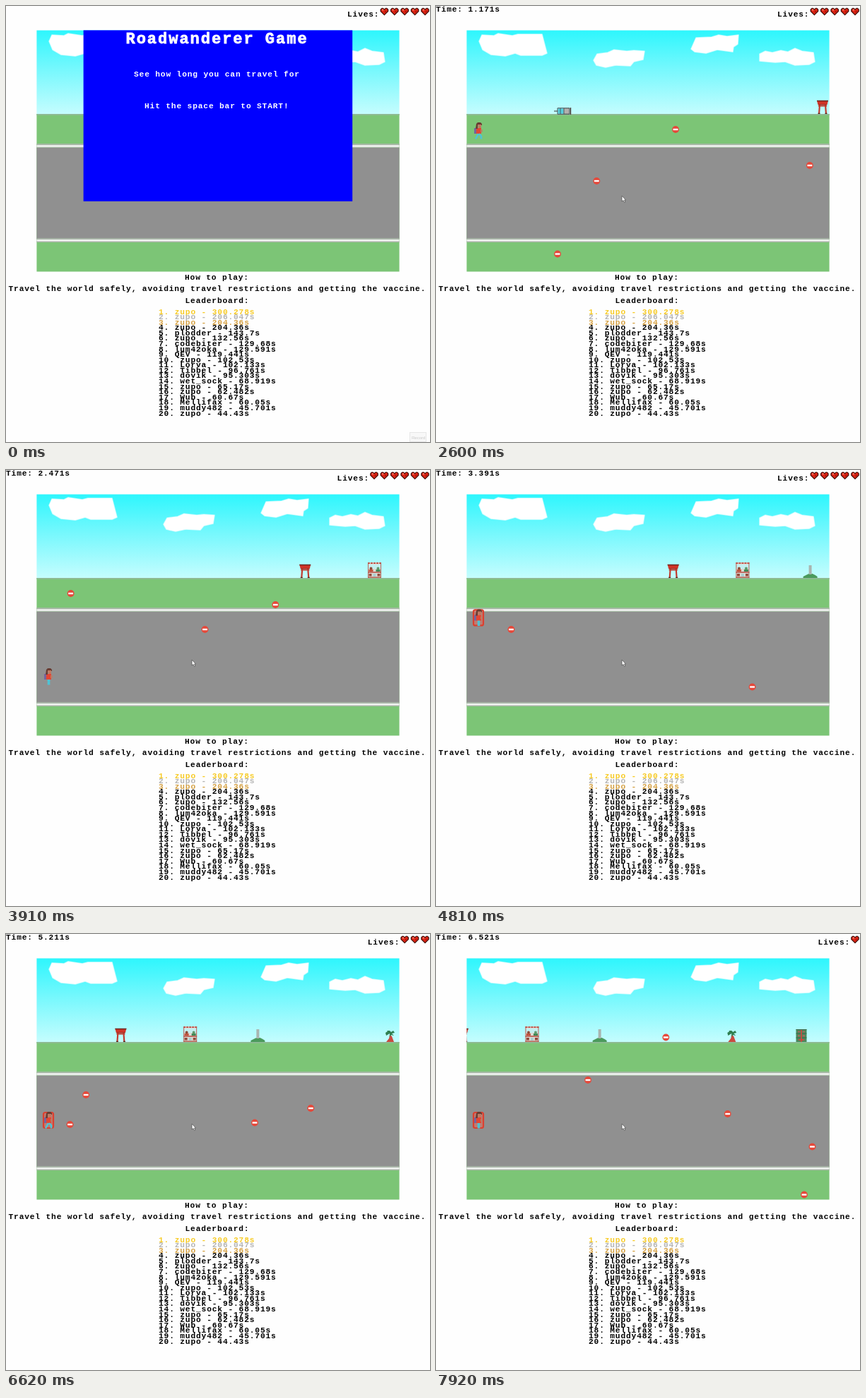
An HTML page that plays this animation: 600 by 618 pixels, repeating every 8 s.

```html
<!DOCTYPE html>
<html lang="en">
<head>
<meta charset="utf-8">
<title>Travel game</title>
<style>
  html, body { margin: 0; width: 100%; height: 100%; overflow: hidden; background: #fefefe; }
  svg { display: block; width: 600px; height: 618px; }
  text {
    font: bold 11.2px "Liberation Mono", monospace;
    letter-spacing: .86px;
    white-space: pre;
  }
  .title { font-size: 22px; letter-spacing: 1.98px; stroke: #fff; stroke-width: .8px; }
  .light { fill: #fff; }
</style>
</head>
<body>
<svg viewBox="0 0 600 618">
  <defs>
    <linearGradient id="sky" x1="0" y1="0" x2="0" y2="1">
      <stop offset="0" stop-color="#2df6fd"/>
      <stop offset=".45" stop-color="#74f8fd"/>
      <stop offset="1" stop-color="#c6fdfe"/>
    </linearGradient>
    <clipPath id="view"><rect x="43.4" y="34.4" width="513.2" height="342.2"/></clipPath>

    <g id="sign">
      <circle r="4.900" fill="#e5483a"/>
      <rect x="-3.4" y="-1.2" width="6.800" height="2.4" fill="#fff"/>
    </g>

    <g id="heart">
      <path d="M0 5.5L-5.8-.3V-3.2L-3.8-5.3H-1.6L0-3.7L1.6-5.3H3.8L5.8-3.2V-.3Z" fill="#3a0d08"/>
      <path d="M0 4L-4.6-.7V-2.8L-3.3-4.2H-2L0-2.2L2-4.2H3.3L4.6-2.8V-.7Z" fill="#dd2414"/>
      <path d="M-3.2-3.2h2v1.5h-2z" fill="#f3a08c"/>
      <path d="M1-1.2h2.2l-1.6 2.4H.4z" fill="#a5150c"/>
    </g>

    <g id="syringe">
      <path d="M-13 0h6" stroke="#333" stroke-width="1.2"/>
      <path d="M-8-4.2h17v8.4h-17z" fill="#b2b0ae" stroke="#3c4448"/>
      <path d="M-7.5-3.7h8v7.4h-8z" fill="#55cfdd"/>
      <path d="M-4-4v8M1-4v8" stroke="#3c4448" stroke-width=".8"/>
      <path d="M10.5-5v10" stroke="#4a3430" stroke-width="1.3"/>
    </g>

    <g id="gate">
      <path d="M-8-19H8L6.5-13H-6.5Z" fill="#cf3427"/>
      <path d="M-8-18.5H8" stroke="#6e2620" stroke-width="1.5"/>
      <path d="M-6-11.5H6M-4-13L-5 0M4-13L5 0" stroke="#c23a2d" stroke-width="2.2"/>
      <path d="M-6-13H6" stroke="#8b2a22" stroke-width=".8"/>
      <path d="M-6.5-.6h3M3.5-.6h3" stroke="#552722" stroke-width="1.2"/>
    </g>

    <g id="stall">
      <path d="M-9.5-22h19v22h-19z" fill="#dcdcd6"/>
      <path d="M-9.5-21h19" stroke="#c1574c" stroke-width="2" stroke-dasharray="3 1"/>
      <path d="M-8.5-19h17v6h-17z" fill="#c3eff0"/>
      <path d="M-8-12h6v3h-6z" fill="#c2553f"/>
      <path d="M2-12h6v3h-6z" fill="#3f8a58"/>
      <circle cx="-5" cy="-13.5" r="2" fill="#8d4b38"/>
      <circle cx="5" cy="-13.5" r="2" fill="#5f9a6c"/>
      <path d="M-9.5-8h19M-9.5-.8h19" stroke="#b8483c" stroke-width="1.3"/>
      <path d="M-8-6h4v3.5h-4zM4-6h4v3.5h-4z" fill="#934a3a"/>
      <path d="M-2-6h4v4h-4z" fill="#a8cdd0"/>
      <path d="M-9-22V0M9-22V0" stroke="#b0594e" stroke-width=".9"/>
    </g>

    <g id="monument">
      <path d="M-10 0V-2L-6-4L-2-6H3L7-4L10-2V0Z" fill="#4b9a5c"/>
      <rect x="-2" y="-18" width="4" height="13" fill="#a9b5b0"/>
    </g>

    <g id="palm">
      <path d="M0-11L3-8L6 0H-5L-1-5Z" fill="#cb4a41"/>
      <path d="M0-12L-5-9L-6-13L-3-15L-4-16H0L2-14L5-16L7-13L3-12L6-9L2-10L0-7Z" fill="#2f7f50"/>
    </g>

    <g id="house">
      <path d="M-7.5-18h15v18h-15z" fill="#4a8a5c"/>
      <path d="M-7.5-17.5h15M-7.5-12h15M-7.5-6h15" stroke="#3a6048" stroke-width=".9"/>
      <path d="M-5-15.500h3v2h-3zM2-15.500h3v2h-3zM-5-10h3v2.5h-3zM2-10h3v2.5h-3z" fill="#a8675a"/>
      <path d="M0-17V0M-4-3h8" stroke="#c94b40" stroke-width="1.800"/>
    </g>
  </defs>

  <g clip-path="url(#view)">
    <rect x="43" y="34" width="514" height="120" fill="url(#sky)"/>
    <g fill="#fff" stroke="#fff" stroke-width="1.6" stroke-opacity=".6" stroke-linejoin="round">
      <path d="M61 50L65 41L82 42L88 39L108 42L116 40L150 40L157 67L150 70L120 70L112 67L98 71L78 69L66 62Z"/>
      <path d="M223 77L228 68L243 66L252 62L270 64L280 63L295 64L293 76L280 79L275 85L254 84L240 87L227 84Z"/>
      <path d="M361 61L368 45L390 44L400 41L412 43L428 41L427 54L421 58L420 65L398 62L382 67L366 65Z"/>
      <path d="M458 68L466 64L476 66L488 63L498 65L508 60L518 64L534 66L536 79L528 83L508 84L494 79L480 80L458 78Z"/>
    </g>
    <rect x="43" y="153" width="514" height="224" fill="#7cc576"/>
    <rect x="43" y="153" width="514" height="2" fill="#8dbb92"/>
    <rect x="43" y="195" width="514" height="7" fill="#a3b8a2"/>
    <rect x="43" y="197" width="514" height="3" fill="#e9ece9"/>
    <rect x="43" y="201" width="514" height="129" fill="#909090"/>
    <rect x="43" y="329" width="514" height="6" fill="#a9b5a8"/>
    <rect x="43" y="331" width="514" height="2.5" fill="#f1f3f1"/>
    <g id="game">
      <g id="movers"></g>
      <g id="player">
        <rect id="flash" x="-7" y="-11" width="14" height="22" rx="2.5"
          fill="#e0705f" fill-opacity=".6" stroke="#dc4030" stroke-width="2.2"/>
        <path d="M-6-4h4v8h-4z" fill="#77639c"/>
        <path d="M-3-4H4V4H-3Z" fill="#e24634"/>
        <path d="M-3-10L-1-12H3L5-10V-8H-1V-3H-4Z" fill="#693c32"/>
        <path d="M-1-9H4V-4H0Z" fill="#bd7a63"/>
        <path d="M3-2h2.5v4H3z" fill="#bd7a63"/>
        <path id="legs" stroke="#4fc3d4" stroke-width="2.6" fill="none"/>
      </g>
    </g>
  </g>

  <g id="intro">
    <rect x="109.6" y="34.4" width="380.600" height="242.400" fill="#00f"/>
    <text class="title light" x="169.500" y="52.5">Roadwanderer Game</text>
    <text class="light" x="181" y="99.5">See how long you can travel for</text>
    <text class="light" x="196" y="144.5">Hit the space bar to START!</text>
  </g>

  <text id="clock" x="0" y="8"></text>
  <g id="lives"><text id="label" y="14.5">Lives:</text></g>
  <text x="253" y="388">How to play:</text>
  <text x="3.5" y="403.5">Travel the world safely, avoiding travel restrictions and getting the vaccine.</text>
  <text x="253.5" y="420.5">Leaderboard:</text>
  <g id="board"></g>

  <g id="button">
    <rect x="571.5" y="604.5" width="23" height="13" fill="#f8f8f8" stroke="#e6e6e6"/>
    <text x="574" y="613.5" style="font:6px 'Liberation Sans',sans-serif;letter-spacing:0" fill="#c8c8c8">Record</text>
  </g>
  <path id="cursor" d="M0 0V8L2 6.5L3.5 9.5L4.8 9L3.6 6H5.5Z" fill="#fff" stroke="#555" stroke-width=".8"/>
</svg>

<script>
const LOOP = 8000, START = 1490, STEP = 100.4;
const $ = id => document.getElementById(id);
const add = (parent, tag, attrs, text = '') => {
  const el = document.createElementNS('http://www.w3.org/2000/svg', tag);
  for (const key in attrs) el.setAttribute(key, attrs[key]);
  el.textContent = text;
  return parent.appendChild(el);
};
const place = (el, x, y) => el.setAttribute('transform', `translate(${x.toFixed(2)} ${y.toFixed(2)})`);
const show = (el, on) => el.setAttribute('visibility', on ? 'visible' : 'hidden');

// Linear interpolation through [position, value] pairs
function track(points, at) {
  const i = points.findIndex(p => p[0] > at);
  if (i < 0) return points[points.length - 1][1];
  if (!i) return points[0][1];
  const [a, va] = points[i - 1], [b, vb] = points[i];
  return va + (vb - va) * (at - a) / (b - a);
}

const scores = `zupo 300.278|zupo 206.047|zupo 204.36|zupo 204.36|plodder 143.7|zupo 132.56|codebiter 129.68
lum42oka 129.591|QEV 119.441|zupo 102.53|Lorva 102.133|Tibbel 96.761|dovik 95.303|wet_sock 68.919
zupo 65.17|zupo 62.482|Wub 60.67|Mellifax 60.05|muddy482 45.701|zupo 44.43`.split(/[|\n]/);
const medals = ['#f7cb25', '#b4b4b4', '#d5a144'];
scores.forEach((row, i) => add($('board'), 'text',
  { x: 216, y: 436.5 + i * 7.58, fill: medals[i] || '#000' },
  `${i + 1}. ${row.replace(' ', ' - ')}s`));

// kind, y, speed in px/s, and a game time with the x at that time
const movers = [
  ['gate', 153, 95.2, 1.171, 547],
  ['stall', 153, 95.2, 2.471, 521.5],
  ['monument', 153, 95.2, 4.201, 452.5],
  ['palm', 153, 95.2, 5.211, 543],
  ['house', 153, 95.2, 6.521, 517],
  ['syringe', 149, 333, 1.171, 180],
  ['sign', 175, 190.3, 1.171, 339],
  ['sign', 248, 285.3, 1.171, 227.3],
  ['sign', 351.5, 332.8, 1.171, 172],
  ['sign', 226, 190.3, 2.471, 281.5],
  ['sign', 191, 380.6, 2.471, 381.3],
  ['sign', 307.5, 285.3, 4.201, 216.5],
  ['sign', 228, 285.3, 4.201, 401.3],
  ['sign', 270, 285.3, 4.201, 378.7],
  ['sign', 267.5, 285.3, 5.211, 352],
  ['sign', 247, 380.6, 5.211, 431.3],
  ['sign', 146.5, 285.3, 6.521, 325.3],
  ['sign', 207, 285.3, 6.521, 215],
  ['sign', 255, 285.3, 6.521, 412.7],
  ['sign', 301.5, 285.3, 6.521, 532.5],
  ['sign', 369.5, 285.3, 6.521, 521]
].map(([kind, y, speed, at, x]) =>
  ({ kind, y, speed, at, x, el: add($('movers'), 'use', { href: '#' + kind }) }));

const hearts = Array.from({ length: 6 }, (_, i) => {
  const el = add($('lives'), 'use', { href: '#heart' });
  place(el, 593 - i * 14.4, 8);
  return el;
});

const clock = [[0, .06], [11, 1.171], [24, 2.471], [41, 4.201], [51, 5.211], [64, 6.521]];
const walk = [[.3, 279], [.95, 177], [1.3, 177], [1.42, 162], [1.7, 162], [2.4, 293], [2.7, 293],
  [3.2, 201], [3.45, 212], [4.05, 313], [4.75, 313], [5.05, 264]];
const hits = [3.27, 3.55, 4.7, 5.27, 6.19];
const bonus = 1.5;
const pointerX = [[0, 537], [1, 515], [2, 450], [3, 365], [4, 295], [5, 258], [6, 263]];
const pointerY = [[0, 590], [1, 560], [2, 480], [3, 380], [4, 305], [5, 264], [6, 269]];

function drawLives(count) {
  $('label').setAttribute('x', 555 - count * 14.4);
  hearts.forEach((el, i) => show(el, i < count));
}

function drawGame(tick) {
  const raw = track(clock, tick);
  const now = tick ? Math.round(raw * 100 - .1) / 100 + .001 : raw;
  $('clock').textContent = `Time: ${+now.toFixed(3)}s`;
  for (const m of movers) {
    place(m.el, m.x - m.speed * (now - m.at), m.y);
    if (m.kind === 'syringe') show(m.el, now < bonus);
  }
  place($('player'), 60, track(walk, now));
  $('legs').setAttribute('d', tick % 5 > 2 ? 'M0 4V11.5M1 4V11.5' : 'M0 4L-4 11.5M1 4L4 7.5V11.5');
  show($('flash'), hits.some(h => now >= h && now < h + .55));
  drawLives(5 + (now >= bonus) - hits.filter(h => now >= h).length);
}

function draw(ms) {
  const playing = ms >= START;
  $('intro').style.display = playing ? 'none' : '';
  $('game').style.display = playing ? '' : 'none';
  $('button').style.display = ms < 100 ? '' : 'none';
  const move = Math.min(6, Math.floor((ms - 380) / 101));
  show($('cursor'), ms >= 380);
  place($('cursor'), track(pointerX, move), track(pointerY, move));
  if (playing) return drawGame(Math.floor((ms - START) / STEP));
  $('clock').textContent = '';
  drawLives(5);
}

const begin = performance.now();
function loop() {
  draw((performance.now() - begin) % LOOP);
  requestAnimationFrame(loop);
}
loop();
</script>
</body>
</html>
```
